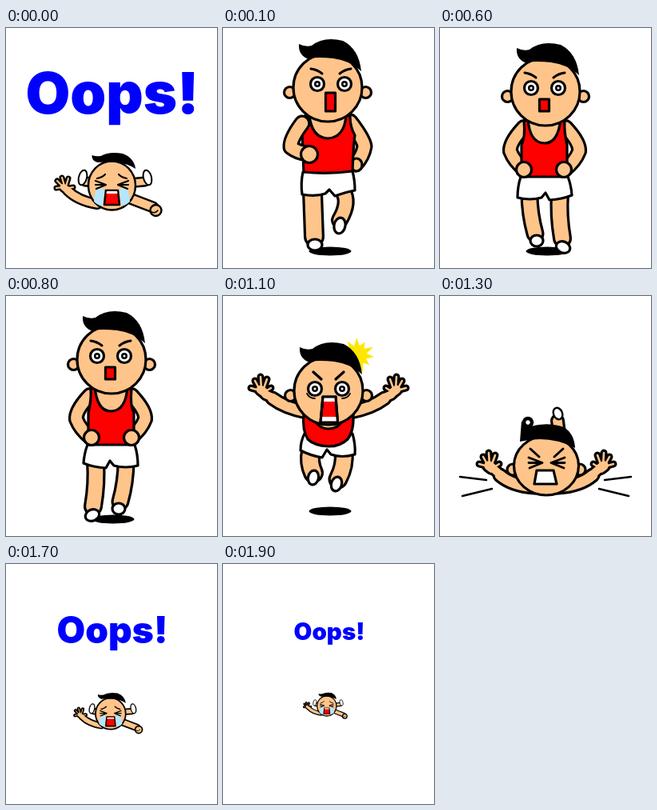
Write an HTML page with a canvas that moves like this. It is 264 px wide and 300 px high and loops after 2 s.

```html
<!DOCTYPE html>
<html lang="en">
<head>
<meta charset="utf-8">
<title>Oops!</title>
<style>
  html, body { margin: 0; width: 100%; height: 100%; overflow: hidden; background: #fff; }
  canvas { display: block; width: 264px; height: 300px; }
</style>
</head>
<body>
<canvas id="stage" width="264" height="300"></canvas>
<script>
const ctx = document.getElementById('stage').getContext('2d');
const SKIN = '#ffc48a', RED = '#f00', WHITE = '#fff', BLACK = '#000', TEAR = '#b4e6ff';
const LOOP = 2000, STEP = 100, AXIS = 131;
const HAIR = 'M95 20Q103 24 111 22Q126 10 150 16Q170 26 173 54Q160 41 138 38Q120 36 105 38Q94 33 95 20Z';
let lineWeight = 3.2;

function shape(d, fill, weight = lineWeight) {
  const path = new Path2D(d);
  if (fill) { ctx.fillStyle = fill; ctx.fill(path); }
  if (weight) {
    ctx.lineWidth = weight;
    ctx.strokeStyle = BLACK;
    ctx.stroke(path);
  }
}

function oval(x, y, rx, ry = rx, fill = SKIN, weight = lineWeight, turn = 0) {
  ctx.beginPath();
  ctx.ellipse(x, y, rx, ry, turn, 0, 7);
  ctx.fillStyle = fill;
  ctx.fill();
  if (weight) {
    ctx.lineWidth = weight;
    ctx.strokeStyle = BLACK;
    ctx.stroke();
  }
}

// Rounded skin tubes, given as [path, width], merged into one outlined silhouette.
function tubes(...parts) {
  for (const [color, inset] of [[BLACK, 0], [SKIN, 2 * lineWeight]]) {
    ctx.strokeStyle = color;
    for (const [d, width] of parts) {
      ctx.lineWidth = width - inset;
      ctx.stroke(new Path2D(d));
    }
  }
}
const limb = (d, width) => tubes([d, width]);

function placed(transform, draw) {
  ctx.save();
  ctx.transform(...transform);
  draw();
  ctx.restore();
}
const shifted = (dx, dy, draw) => placed([1, 0, 0, 1, dx, dy], draw);
const mirrored = (axis, draw) => placed([-1, 0, 0, 1, 2 * axis, 0], draw);
const bothSides = (axis, draw) => { draw(); mirrored(axis, draw); };

const shadow = y => oval(134, y, 26.5, 5.5, BLACK, 0);

function head(dx, dy, face) {
  shifted(dx, dy, () => {
    bothSides(AXIS, () => oval(83.5, 80.5, 7));
    oval(AXIS, 74.5, 43, 42.5);
    shape(HAIR, BLACK, 0);
    face();
  });
}

function eye(x, y) {
  oval(x, y, 8.5, 8.5, WHITE);
  oval(x, y, 4, 4, BLACK, 0);
  oval(x, y, 1.5, 1.5, WHITE, 0);
}

function runFace(shift, mouthTop, mouthHeight) {
  shifted(shift, 0, () => {
    bothSides(AXIS, () => {
      eye(114, 70);
      shape('M106 51Q114 52 120 57', null, 3);
    });
    shape(`M124.5 ${mouthTop}h12v${mouthHeight}h-12Z`, RED);
  });
}

function strideUp(side) {
  const body = () => {
    limb('M103 117Q86 139 85 148Q87 160 96 170', 21);
    oval(95, 171, 7, 8);
    limb('M150 205L148 261', 26);
    oval(147, 271, 9, 7, WHITE);
    limb('M112 204Q103 218 116 240', 22);
    oval(116, 247, 7, 10, WHITE, lineWeight, -0.2);
    shape('M103 110L159 109Q158 124 163 132L161 181Q130 183 100 180Q99 148 97 134Q103 124 103 110Z', RED);
    shape('M108 109Q110 137 131 138Q151 137 154 109Z', SKIN);
    shape('M100 179Q130 183 162 180Q165 194 163 208Q147 211 134 207L129 202L122 210Q108 205 97 203Q97 190 100 179Z', WHITE);
    limb('M163 119Q178 139 177 149Q168 156 156 157', 21);
    oval(154, 158, 10.5);
  };
  shadow(279);
  if (side < 0) body(); else mirrored(AXIS, body);
  head(0, 0, () => runFace(side * 4, 81, 23));
}

function strideDown(side) {
  const body = () => {
    limb('M150 207Q150 232 143 257', 23);
    oval(141, 266, 8, 7, WHITE);
    limb('M112 207Q114 234 109 263', 24);
    oval(108, 274, 9, 7, WHITE, lineWeight, -0.4);
    bothSides(AXIS, () => limb('M105 124Q87 143 88 154Q93 167 106 177', 20));
    shape('M106 116L157 116Q155 137 160 146L160 188H103V146Q107 130 106 116Z', RED);
    shape('M111 113Q114 144 131 144Q150 144 152 113Z', SKIN);
    shape('M102 186H161Q165 198 165 212Q149 216 135 212L130 206L125 215Q109 214 97 209Q98 196 102 186Z', WHITE);
    bothSides(AXIS + 1, () => oval(107, 177, 9.5));
  };
  shadow(279);
  if (side < 0) body(); else mirrored(AXIS, body);
  head(1, 5, () => runFace(-1, 84, 15));
}

const FINGERS = 'M46 118L35 115M46 117L40 106M48 117L47 101M50 118L55 104M52 120L60 115';
const PALM = 'M47 117L51 120';

function raisedArm() {
  tubes([FINGERS, 9], [PALM, 17], ['M53 123L62 127', 16], ['M62 128Q78 140 104 145', 19]);
}

function star(x, y) {
  let d = '';
  for (let i = 0; i < 22; i++) {
    const angle = i * Math.PI / 11 + 0.1;
    const radius = i % 2 ? 12 : 21 + 2 * Math.sin(i * 2);
    d += `${i ? 'L' : 'M'}${x + radius * Math.cos(angle)} ${y + radius * Math.sin(angle)}`;
  }
  shape(d + 'Z', '#ffe600', 0);
}

function shockFace() {
  bothSides(AXIS, () => {
    eye(114, 72);
    shape('M112 51L122 60', null, 3.3);
    shape('M104 78Q107 84 114 84', null, 1.8);
  });
  shape('M124 82H140L142.5 114H121Z', RED);
  shape('M124 82H140L140.5 88H123.5Z', WHITE, 0);
  shape('M121.5 107H142L142.5 114H121Z', WHITE, 0);
  shape('M124 82H140L142.5 114H121Z');
}

function jump() {
  shadow(269);
  star(168, 74);
  limb('M110 194Q107 208 113 221', 26);
  oval(113, 227, 6.5, 9, WHITE, lineWeight, 0.2);
  limb('M151 194Q153 212 144 229', 25);
  oval(142, 235, 6.5, 9, WHITE, lineWeight, 0.3);
  bothSides(AXIS + 1, raisedArm);
  shape('M102 172H162Q166 186 165 198Q149 203 135 198L130 192L124 202Q108 199 97 193Q97 182 102 172Z', WHITE);
  shape('M101 148H163Q164 169 156 179Q147 188 132 188Q114 187 106 179Q99 168 101 148Z', RED);
  shape('M115 156Q121 166 132 166Q144 166 149 156Z', SKIN);
  head(1, 44, shockFace);
}

function fall() {
  shadow(257);
  shifted(0, 50, () => bothSides(AXIS + 1, raisedArm));
  head(1, 95, shockFace);
}

function squeezedEye() {
  shape('M111 202L128 208.5L112 215M111 208.5H128', null, 2.8);
}

function crash() {
  limb('M149 172L147 156', 18);
  oval(147.5, 147, 5.5, 7.5, WHITE, 2.4, -0.4);
  oval(110, 158, 5, 5, WHITE, 4.5, -0.4);
  bothSides(133, () => {
    shifted(14, 95, () =>
      tubes([FINGERS, 9], [PALM, 18], ['M54 122L61 128', 16], ['M61 129Q76 142 104 144', 19]));
    oval(91, 217, 7);
  });
  bothSides(132, () => shape('M25 226L58 230M28 250L65 241', null, 2.6));
  oval(133, 212, 40.5, 37);
  shape('M100 182L102 156Q107 166 113 163Q135 157 155 164Q168 172 169 190Q137 173 100 182Z', BLACK, 0);
  bothSides(133.5, () => {
    squeezedEye();
    shape('M113 191L124 201', null, 3);
  });
  shape('M121 218H142L146 235H118Z', WHITE);
}

function crying() {
  bothSides(136.5, () => {
    limb('M99 192L110 193', 13);
    oval(96, 187, 5, 9.5, WHITE, 2, 0.25);
  });
  tubes(
    ['M71 199L63 200M71 198L64 191M73 197L70 187M75 198L78 188M77 200L84 199', 7],
    ['M72 199L76 202', 13],
    ['M77 203Q90 216 114 220', 14],
  );
  limb('M150 211Q168 218 184 224', 15);
  oval(187.5, 228, 7);
  shape('M182 230Q187 232 190 228', null, 1.5);
  oval(132.5, 197, 29.5, 30.5);
  placed([0.7, 0, 0, 0.5, 41, 149], () => shape(HAIR, BLACK, 0));
  bothSides(132.5, () => {
    shape('M114 201Q119 198 123 202L121 222Q116 223 110 217Q110 208 114 201Z', TEAR, 0);
    shape('M112 191L125 196L113 201M112 196H124', null, 2.2);
    shape('M114 188Q120 187 124 183', null, 2.2);
  });
  shape('M125 203H140L142 221H123Z', RED, 2.5);
  shape('M126 204H139L139.5 207H125.5Z', WHITE, 0);
}

function ending(shrinks) {
  const scale = 0.8 ** shrinks;
  placed([scale, 0, 0, scale, 133, 87], () => {
    ctx.font = '900 72px Inter, "Liberation Sans", sans-serif';
    ctx.textAlign = 'center';
    ctx.fillStyle = '#00f';
    ctx.fillText('Oops!', 0, 19.5);
  });
  lineWeight = 2.4 * scale ** -0.3;
  placed([scale, 0, 0, scale, 128 * (1 - scale), 196.5 - 4.8 * shrinks - 196.5 * scale], crying);
  lineWeight = 3.2;
}

const runCycle = [
  () => strideDown(-1),
  () => strideUp(1),
  () => strideDown(1),
  () => strideUp(-1),
];

function draw(step) {
  ctx.fillStyle = WHITE;
  ctx.fillRect(0, 0, 264, 300);
  ctx.lineCap = ctx.lineJoin = 'round';
  if (step === 0) ending(0);
  else if (step <= 10) runCycle[step % 4]();
  else if (step === 11) jump();
  else if (step === 12) fall();
  else if (step <= 14) crash();
  else ending(step - 15);
}

function frame() {
  draw(Math.floor(performance.now() % LOOP / STEP));
  requestAnimationFrame(frame);
}
frame();
</script>
</body>
</html>
```
